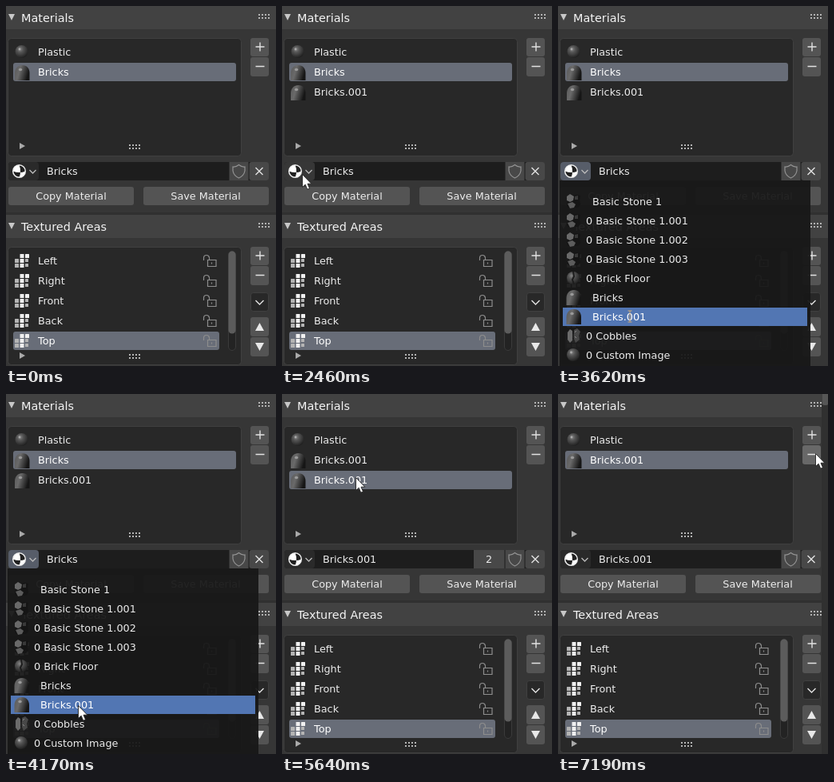
An HTML page for the animation above (8 s loop, 338 px wide and 450 px high).

```html
<!DOCTYPE html>
<html lang="en">
<head>
<meta charset="utf-8">
<title>Material panel</title>
<style>
  html, body { margin: 0; width: 100%; height: 100%; overflow: hidden; background: #363636; }
  svg { display: block; width: 100%; height: 100%; }
  text { font: 12.8px "DejaVu Sans", sans-serif; fill: #ececec; }
  .title { font-size: 14.4px; fill: #f4f4f4; }
  .on { fill: #fff; }
  .mid { text-anchor: middle; }
  .line { fill: none; stroke: #e2e2e2; stroke-width: 1.4; }
</style>
</head>
<body>
<svg viewBox="0 0 338 450">
  <defs>
    <radialGradient id="ball" cx=".38" cy=".32" r=".7">
      <stop offset="0" stop-color="#858585"/><stop offset=".35" stop-color="#555"/><stop offset="1" stop-color="#1f1f1f"/>
    </radialGradient>
    <linearGradient id="dome" x2="1" y2=".3">
      <stop offset="0" stop-color="#5a5a5a"/><stop offset=".4" stop-color="#6a6a6a"/><stop offset="1" stop-color="#161616"/>
    </linearGradient>
  </defs>
  <g id="scene"></g>
</svg>
<script>
const LOOP = 8000;
const BLUE = '#5276b3', SELECTED = '#686d78', BUTTON = '#545454', HOVER = '#686868';

// Pointer positions: [ms, x, y], each held until the next.
const track = [
  [680, 151, 391], [760, 141, 346], [840, 127, 298], [910, 112, 262], [990, 101, 243], [1070, 95, 237],
  [2080, 78, 232], [2160, 50, 221], [2230, 33, 214], [2310, 26, 211], [2460, 25, 210],
  [3390, 66, 295], [3470, 77, 328], [3540, 85, 360], [3620, 90, 388], [3700, 92, 403], [3770, 91, 401], [3850, 90, 389],
  [5010, 91, 376], [5090, 107, 290], [5170, 114, 190], [5240, 104, 126], [5320, 92, 104],
  [6190, 112, 102], [6270, 160, 97], [6350, 224, 86], [6420, 278, 76], [6500, 304, 72],
  [6580, 314, 73], [6650, 320, 74], [6730, 322, 74]
];

// Interface changes, applied in order.
const events = [
  [0, { names: ['Plastic', 'Bricks'], row: 1, field: 'Bricks', users: 1, pressed: '', menu: false, beam: false, scroll: 0 }],
  [1370, { pressed: 'copy' }],
  [1600, { pressed: '', names: ['Plastic', 'Bricks', 'Bricks.001'] }],
  [2690, { menu: true, beam: true }],
  [4170, { beam: false }],
  [4250, { menu: false, names: ['Plastic', 'Bricks.001', 'Bricks.001'], field: 'Bricks.001', users: 2 }],
  [5640, { row: 2 }],
  [6420, { scroll: .5 }],
  [6500, { scroll: 1 }],
  [6960, { pressed: 'remove' }],
  [7190, { pressed: '', names: ['Plastic', 'Bricks.001'], row: 1, users: 1 }]
];

const menuItems = [
  ['Basic Stone 1', 'stone'], ['0 Basic Stone 1.001', 'stone'], ['0 Basic Stone 1.002', 'stone'],
  ['0 Basic Stone 1.003', 'stone'], ['0 Brick Floor', 'split'], ['Bricks', 'dome'],
  ['Bricks.001', 'dome'], ['0 Cobbles', 'cobble'], ['0 Custom Image', 'ball']
];
const areas = ['Left', 'Right', 'Front', 'Back', 'Top'];

const rect = (x, y, w, h, fill, r = 0, more = '') =>
  `<rect x="${x}" y="${y}" width="${w}" height="${h}" rx="${r}" fill="${fill}" ${more}/>`;
const path = (d, more = 'class="line"') => `<path d="${d}" ${more}/>`;
const fillPath = (d, fill) => path(d, `fill="${fill}"`);
const text = (x, y, s, cls = '') => `<text x="${x}" y="${y}" class="${cls}">${s}</text>`;
const at = (x, y, s) => `<g transform="translate(${x} ${y})">${s}</g>`;

const grip = (x, y) => {
  let s = '';
  for (let i = 0; i < 8; i++) s += rect(x + (i % 4) * 4, y + (i >> 2) * 4, 2, 2, '#b4b4b4');
  return s;
};

const icons = {
  ball: '<circle r="8" fill="url(#ball)"/><circle cx="-2.500" cy="-3" r="1.4" fill="#aaa"/>',
  dome: fillPath('M-8.500 10V1C-8.500 -5 -4.500 -9 1 -9S10 -5 10 1V10Z', 'url(#dome)') +
    '<ellipse cx="-1.500" cy="-3.500" rx="2.200" ry="1.700" fill="#9a9a9a"/>',
  stone: fillPath('M-8 -6L-4 -9 0 -7 4 -8 9 -7 8 -1 9 4 6 8 0 8 -4 9 -8 6 -7 0Z', '#151515') +
    fillPath('M-8 -6L-4 -9 1 -6 0 -1 -4 1 -8 -1Z', '#696969') + fillPath('M-7 3L-1 1 3 4 1 8 -4 9Z', '#5c5c5c') +
    fillPath('M2 -6L6 -7 6 -2 2 -2Z', '#393939'),
  split: '<circle r="8" fill="url(#ball)"/>' + path('M0 -8L1 -2 -1 2 1 8', 'fill="none" stroke="#1d1d1d" stroke-width="2"'),
  cobble: fillPath('M-7 -4L-4 -8 -1 -6V6L-4 9 -7 5Z', '#6b6b6b') + fillPath('M1 -7L5 -9 9 -5 7 0 8 5 3 9 1 4Z', '#484848') +
    path('M2 -4L4 -6M2 1L4 3', 'stroke="#8a8a8a"')
};

const groupIcon = (() => {
  let s = '';
  for (let i = 1; i < 9; i++) {
    const col = i % 3, row = i / 3 | 0, size = col === 2 && row ? 4 : 5;
    s += rect(col * 6.5, row * 6, size, size, col === 1 || i === 2 ? '#f0f0f0' : '#b4b4b4', .5);
  }
  return s;
})();

const lock = path('M6.500 6.500H17V14.500H6.500ZM8.500 6.500V4A3.500 3.500 0 0 0 1.500 4V7M11.500 9.500V11.500',
  'fill="none" stroke="#8d8d8d" stroke-width="1.2"');

const arrow = path('M.5 .5V16.500L4.200 13.200 6.700 19.200 9.500 18 7 12.200H11.800Z',
  'fill="#fff" stroke="#222" stroke-width=".9"');
const beam = path('M-2.500 -7H2.500M0 -7V7M-2.500 7H2.500', 'fill="none" stroke="#c8a87c" stroke-width="1"');

function header(y, name) {
  return rect(0, y, 338, 29, '#424242') + fillPath(`M3 ${y + 10}H11L7 ${y + 18}Z`, '#c8c8c8') +
    text(19, y + 20, name, 'title') + grip(316, y + 10);
}

function listBox(y, gripY) {
  return rect(2.5, y + .5, 292, 147, '#282828', 4, 'stroke="#404040"') +
    fillPath(`M17 ${gripY - 4}L24 ${gripY} 17 ${gripY + 4}Z`, '#aaa') + grip(154, gripY - 2);
}

function plusMinus(y, minusFill) {
  return rect(306, y, 23, 23, BUTTON, 3) + rect(306, y + 24, 23, 24, minusFill, 3) +
    path(`M312.500 ${y + 11}H323.500M318 ${y + 5.500}V${y + 16.500}M312.500 ${y + 35.500}H323.500`);
}

function materials(s, over) {
  const paint = (id, hit) => s.pressed === id ? BLUE : hit ? HOVER : BUTTON;
  let out = header(0, 'Materials') + listBox(40, 175);
  out += rect(9, 71 + (s.row - 1) * 25, 279, 23, SELECTED, 3);
  s.names.forEach((name, i) => {
    out += at(19.5, 57 + i * 25 + (i ? 1 : 0), icons[i ? 'dome' : 'ball']);
    out += text(40, 62 + i * 25, name, i === s.row ? 'on' : '');
  });
  out += plusMinus(40, paint('remove', over(306, 64, 329, 88)));

  // Data-block field
  const browse = s.menu ? '#575d69' : over(3, 195, 41, 218) ? '#373737' : '#2a2a2a';
  out += rect(3, 195, 326, 23, '#1d1d1d', 4) + rect(3, 195, 38, 23, browse, 4);
  out += '<circle cx="16.500" cy="206.500" r="7.800" fill="#202020" stroke="#eee" stroke-width="1.5"/>' +
    fillPath('M18 208Q18.500 203 16.500 199A7.500 7.500 0 0 0 9 206.500Q13 208.500 18 208ZM18 208Q21 208 24 206.500A7.500 7.500 0 0 1 16.500 214Q18 211 18 208Z', '#fff');
  out += path('M29.500 205L33.500 209 37.500 205', 'fill="none" stroke="#bbb" stroke-width="1.3"');
  out += text(51, 211, s.field);
  if (s.users > 1) out += rect(240, 195, 38.5, 23, '#484848') + text(259, 211, s.users, 'mid');
  out += rect(279.5, 195, 24, 23, '#484848') + rect(304.5, 195, 24.5, 23, '#484848', 3);
  out += path('M291.500 198.500Q295 201.500 299 201V206Q298 212 291.500 215Q285 212 284 206V201Q288 201.500 291.500 198.500Z',
    'fill="none" stroke="#939393" stroke-width="1.2"');
  out += path('M312.500 202L321.500 211M321.500 202L312.500 211');

  out += rect(3, 226, 157, 23, paint('copy', over(3, 226, 160, 249)), 3) + text(81.5, 242, 'Copy Material', 'mid');
  return out + rect(172, 226, 157, 23, BUTTON, 3) + text(250, 242, 'Save Material', 'mid');
}

function texturedAreas() {
  let out = rect(0, 258, 338, 3, '#303030') + header(261, 'Textured Areas') + listBox(301, 437);
  out += rect(9, 407, 258, 23, SELECTED, 3);
  areas.forEach((name, i) => {
    const y = 318 + i * 25;
    out += at(11, y - 8, groupIcon) + text(40, y + 5, name, i === 4 ? 'on' : '') + at(246, y - 7, lock);
  });
  out += rect(278.5, 306.5, 9, 124, '#232323', 4.5, 'stroke="#3a3a3a"') + rect(278.5, 306.5, 9, 103, '#5c5c5c', 4.5);
  out += plusMinus(301, BUTTON);
  out += rect(306.5, 358.5, 22, 23, '#282828', 3, 'stroke="#404040"') + path('M312.500 368L317.500 373 322.500 368');
  out += rect(306, 389, 23, 24, BUTTON, 3) + rect(306, 414, 23, 24, BUTTON, 3);
  return out + fillPath('M312 406L317.500 396 323 406ZM312 421H323L317.500 431Z', '#e8e8e8');
}

function menu(pointer) {
  const [, , y] = pointer;
  const active = y < 232 ? 5 : Math.floor((y - 232) / 24);
  let out = rect(2, 218, 314, 240, '#181818', 0, 'fill-opacity=".94"');
  out += rect(6, 233 + active * 24, 306, 23, BLUE);
  menuItems.forEach(([name, icon], i) => {
    out += at(19, 244 + i * 24, icons[icon]);
    out += text(name[0] === '0' ? 35 : 43, 248.5 + i * 24, name, i === active ? 'on' : '');
  });
  return out;
}

function draw(time) {
  const state = Object.assign({}, ...events.filter(e => e[0] <= time).map(e => e[1]));
  const pointer = track.filter(p => p[0] <= time).pop();
  const over = (x1, y1, x2, y2) => !!pointer &&
    pointer[1] >= x1 && pointer[1] < x2 && pointer[2] >= y1 && pointer[2] < y2;
  let out = rect(0, 0, 338, 450, '#363636') + materials(state, over) + texturedAreas();
  if (state.scroll) {
    out += `<g opacity="${state.scroll}">${rect(330, 0, 8, 450, '#303030')}${rect(330.5, -6, 8, 20, '#565656', 3)}</g>`;
  }
  if (state.menu) out += menu(pointer);
  if (pointer) out += at(pointer[1], pointer[2], state.beam ? beam : arrow);
  return out;
}

const scene = document.getElementById('scene');
const marks = [...new Set([...track, ...events].map(e => e[0]))].sort((a, b) => a - b);
const start = performance.now();
let shown = -1;

function tick() {
  const time = Math.max(0, performance.now() - start) % LOOP;
  const mark = marks.filter(m => m <= time).pop();
  if (mark !== shown) {
    scene.innerHTML = draw(mark);
    shown = mark;
  }
  requestAnimationFrame(tick);
}
tick();
</script>
</body>
</html>
```
